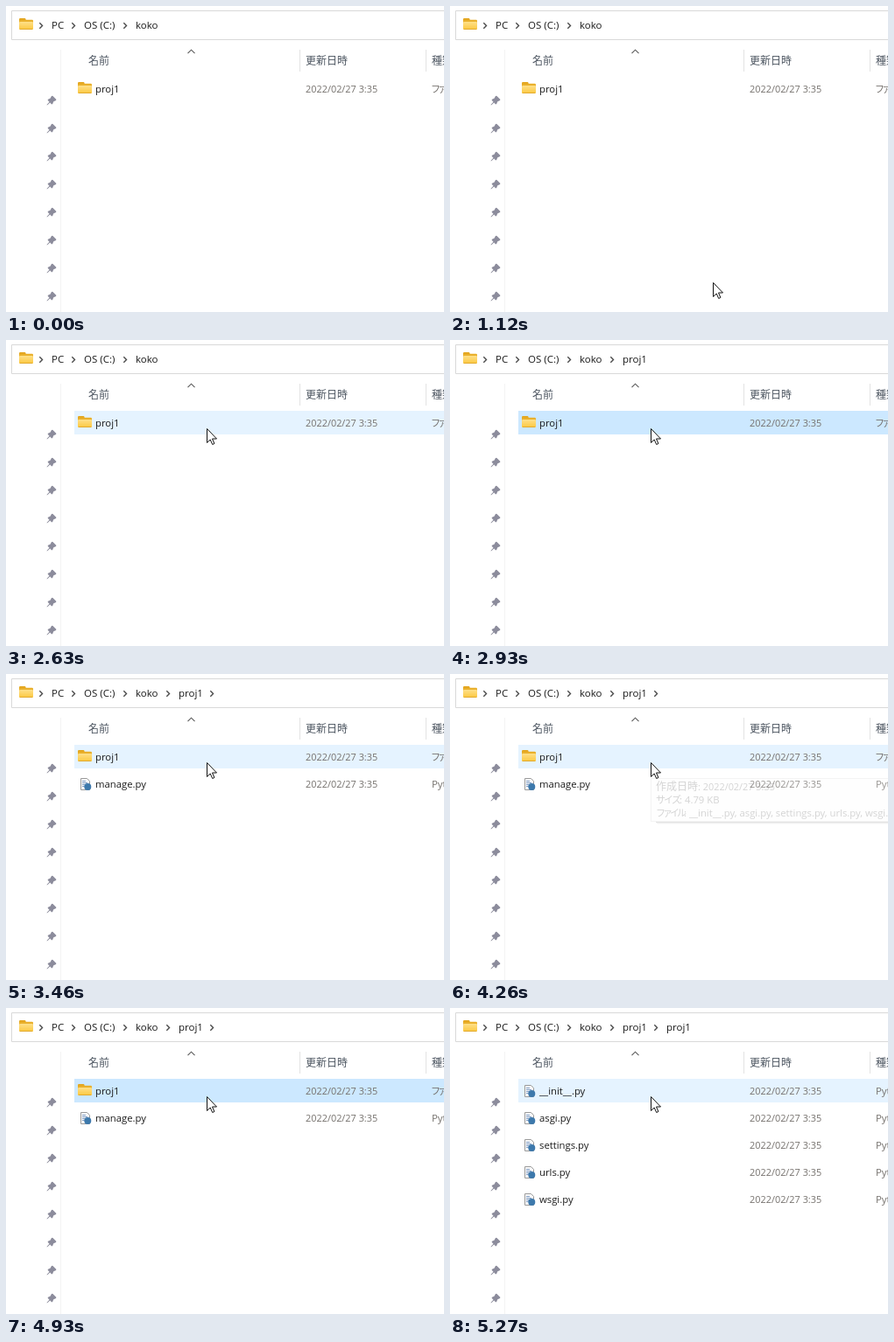
These frames come from a looping animation (500x350 px, 7.87 s). An HTML page with a canvas:

```html
<!DOCTYPE html>
<html lang="ja">
<head>
<meta charset="utf-8">
<title>Folder navigation</title>
<style>
html, body { margin: 0; width: 100%; height: 100%; overflow: hidden; background: #fff; }
canvas { display: block; }
</style>
</head>
<body>
<canvas id="stage" width="500" height="350"></canvas>
<script>
const ctx = document.getElementById('stage').getContext('2d');
const LOOP = 7870;
const LATIN = '"Open Sans", "Noto Sans", sans-serif';
const CJK = '"Noto Sans CJK JP", "Noto Sans CJK", sans-serif';
const DATE = '2022/02/27 3:35';
const FILES = ['__init__.py', 'asgi.py', 'settings.py', 'urls.py', 'wsgi.py'];
const HOVER = '#e5f3ff', SELECTED = '#cce8ff';

// Draws text and returns the x where it ends.
function text(str, x, y, color, size = 11.4, family = LATIN, spacing = 0) {
  ctx.font = `${size}px ${family}`;
  ctx.letterSpacing = spacing + 'px';
  ctx.fillStyle = color;
  ctx.fillText(str, x, y);
  const end = x + ctx.measureText(str).width;
  ctx.letterSpacing = '0px';
  return end;
}

function rect(x, y, w, h, color) {
  ctx.fillStyle = color;
  ctx.fillRect(x, y, w, h);
}

function path(points, dx, dy, closed) {
  ctx.beginPath();
  for (let i = 0; i < points.length; i += 2) ctx.lineTo(points[i] + dx, points[i + 1] + dy);
  if (closed) ctx.closePath();
}

function fillPath(points, x, y, color) {
  path(points, x, y, true);
  ctx.fillStyle = color;
  ctx.fill();
}

function strokePath(points, x, y, color, width, closed) {
  path(points, x, y, closed);
  ctx.strokeStyle = color;
  ctx.lineWidth = width;
  ctx.stroke();
}

function roundRect(x, y, w, h, r, color) {
  ctx.beginPath();
  ctx.roundRect(x, y, w, h, r);
  ctx.fillStyle = color;
  ctx.fill();
}

function folder(x, y) {
  roundRect(x, y, 7.5, 6, 1.2, '#e3a51d');
  roundRect(x, y + 1.7, 16, 11, 1.2, '#e9b02c');
  const g = ctx.createLinearGradient(x, y + 4, x, y + 13);
  g.addColorStop(0, '#ffe08a');
  g.addColorStop(1, '#fbc83f');
  roundRect(x, y + 4, 16, 9, 1.2, g);
  rect(x + 1, y + 12.2, 14, 0.8, '#dda32a');
}

function scriptIcon(y) {
  const page = [85.5, -6.5, 92.5, -6.5, 95.5, -3.5, 95.5, 6.5, 85.5, 6.5];
  fillPath(page, 0, y, '#fafafa');
  strokePath(page, 0, y, '#9a9a9a', 1, true);
  for (let i = 0; i < 4; i++) rect(87, y - 4 + i * 2, i ? 6 : 4, 1, '#7f9cc4');
  ctx.beginPath();
  ctx.arc(93.3, y + 3, 4, 0, 7);
  ctx.fillStyle = '#3d79ac';
  ctx.fill();
}

const chevron = x => strokePath([-1.7, -3.2, 1.5, 0, -1.7, 3.2], x, 22.5, '#4a4a4a', 1.4);

const PIN = [1.2, -5.2, 5.5, -1, 4.7, 0.2, 2.3, 1.3, 1.2, 3.9, 0.1, 4.4, -1.7, 2.5,
  -5, 5.5, -5.5, 5, -2.5, 1.7, -4.4, -0.2, -3.9, -1.3, -1.3, -2.4, -0.1, -5];

function frameUI(t) {
  rect(0, 0, 500, 350, '#fff');
  strokePath([506, 5.5, 6.5, 5.5, 6.5, 38.5, 506, 38.5], 0, 0, '#d9d9d9', 1);
  folder(15, 14);
  const crumbs = [['PC', 52], ['OS (C:)', 89], ['koko', 148]];
  if (t >= 2910) crumbs.push(['proj1', 197]);
  if (t >= 5000) crumbs.push(['proj1', 247]);
  for (const [name, x] of crumbs) text(name, x, 26, '#1b1b1b', 11.5);
  [40, 77, 136].forEach(chevron);
  if (t >= 2910) chevron(185);
  if (t >= 3460) chevron(235);

  strokePath([207.5, 54.2, 211.5, 50.2, 215.5, 54.2], 0, 0, '#5a5a5a', 1.1);
  const header = '#4c5560';
  text('名前', 94, 66.5, header, 12, CJK);
  text('更新日時', 342, 66.5, header, 12, CJK);
  text('種類', 486, 66.5, header, 12, CJK);
  rect(335, 50, 1, 25, '#e3e3e3');
  rect(479, 50, 1, 25, '#e3e3e3');
  rect(62, 50, 1, 300, '#f3f3f3');
  for (let i = 0; i < 8; i++) fillPath(PIN, 52, 108 + 32 * i, '#8c8c9c');
}

function row(i, name) {
  const y = 95 + 31 * i, isFile = name.endsWith('.py');
  if (isFile) scriptIcon(y);
  else folder(82, y - 8);
  text(name, 102, y + 4, '#1b1b1b', 11.3);
  text(DATE, 342, y + 4, '#75716d', 10.9);
  if (isFile) text('Python File', 486, y + 4, '#75716d');
  else text('ファイル', 485, y + 4, '#75716d', 11, CJK, -3);
}

function rowsAt(t) {
  if (t < 2980) return ['proj1'];
  if (t < 3190) return [];
  if (t < 5070) return ['proj1', 'manage.py'];
  return t < 5270 ? [] : FILES;
}

function highlight(t) {
  if (t < 2090) return null;
  if (t < 2160) return '#f2f9ff';
  const pressed = (t >= 2720 && t < 2980) || (t >= 4800 && t < 5070);
  return pressed ? SELECTED : HOVER;
}

function tooltip(alpha) {
  ctx.globalAlpha = alpha;
  rect(235, 169, 265, 1, '#8f8f8f');
  rect(236, 170, 264, 1, '#c4c4c4');
  rect(237, 171, 263, 1, '#ebebeb');
  const box = [506, 119.5, 229.5, 119.5, 229.5, 168.5, 506, 168.5];
  fillPath(box, 0, 0, '#f9f9f9');
  strokePath(box, 0, 0, '#d2d2d2', 1);
  const ink = '#575757';
  let x = text('作成日時', 235, 133, ink, 12, CJK);
  text(': ' + DATE, x, 133, ink, 10.9);
  x = text('サイズ', 235, 148, ink, 11, CJK, -2);
  text(': 4.79 KB', x, 148, ink, 11.3);
  x = text('ファイル', 235, 163, ink, 11, CJK, -3);
  text(': ' + FILES.join(', '), x, 163, ink, 11.3);
  ctx.globalAlpha = 1;
}

const mix = (a, b, p) => a + (b - a) * p;
const step = (t, start, count) => Math.min(count, Math.floor((t - start) / 70));

function cursor(t) {
  if (t < 1120) return;
  let x, y;
  if (t < 2090) {
    const p = step(t, 1120, 11) / 11, e = p * p * (3 - 2 * p);
    x = mix(300, 231, e);
    y = mix(316, 109, e);
  } else {
    const p = (step(t, 2090, 2) + 1) / 3;
    x = mix(231, 229, p);
    y = mix(109, 101, p);
  }
  const arrow = [0.5, 0.5, 0.5, 16.5, 4.2, 13, 6.7, 18.5, 8.9, 17.5, 6.5, 12, 11.5, 12];
  x = Math.round(x);
  y = Math.round(y);
  fillPath(arrow, x, y, '#fff');
  strokePath(arrow, x, y, '#111', 1, true);
}

function draw(now) {
  const t = now % LOOP;
  frameUI(t);
  const rows = rowsAt(t), color = highlight(t);
  if (color && rows.length) rect(78, 81, 422, 27, color);
  rows.forEach((name, i) => row(i, name));
  if (t >= 4260 && t < 4800) {
    tooltip(t < 4730 ? (Math.min(3, Math.floor((t - 4260) / 66)) + 1) / 4 : 0.4);
  }
  cursor(t);
}

const start = performance.now();
function tick() {
  draw(performance.now() - start);
  requestAnimationFrame(tick);
}
tick();
</script>
</body>
</html>
```
